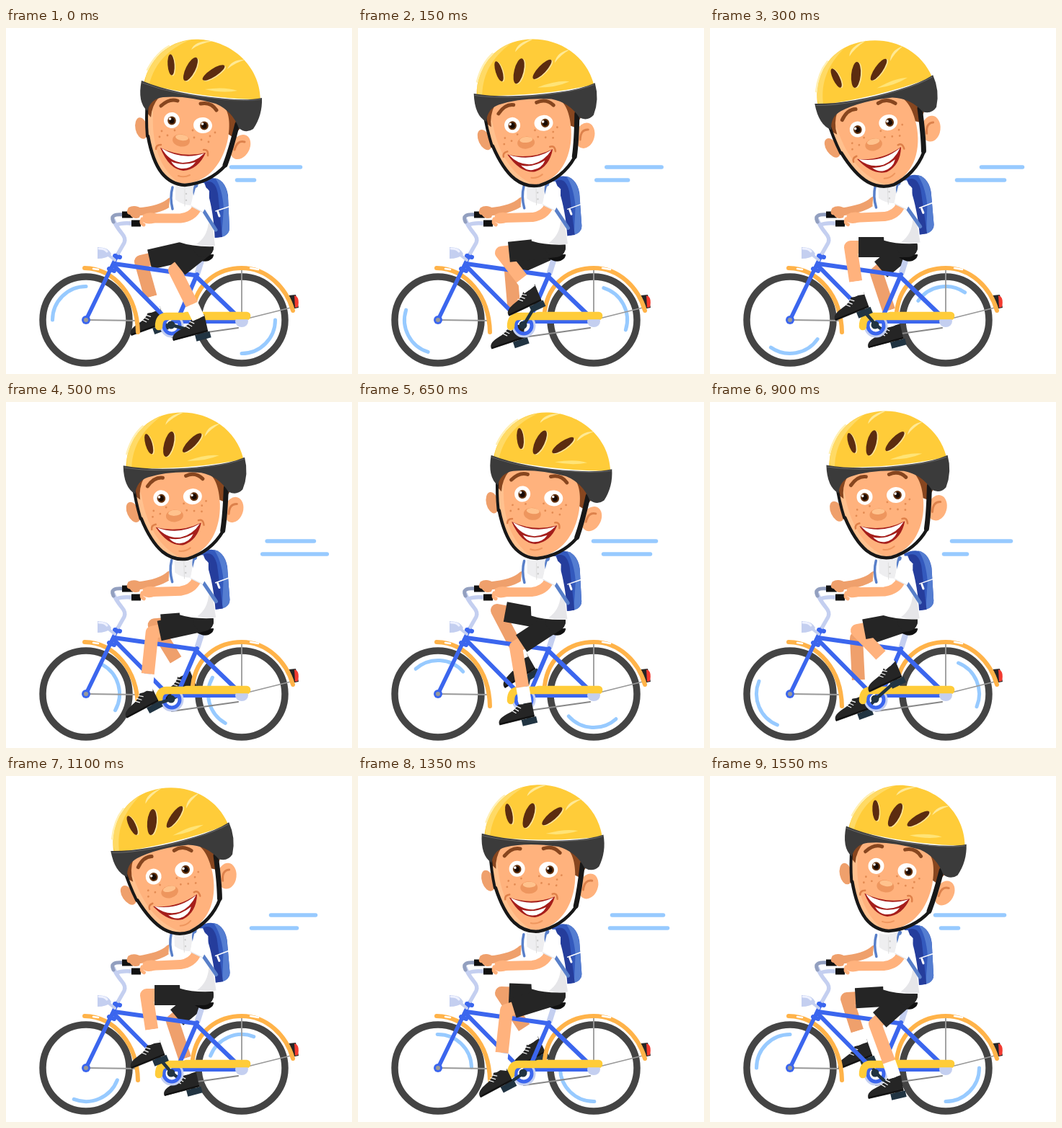
Recreate the animation shown at these times as an HTML page with a canvas. Size 480 by 480 pixels, loop 1600 ms.

```html
<!DOCTYPE html>
<html>
<head>
<meta charset="utf-8">
<style>
html, body { margin: 0; width: 100%; height: 100%; overflow: hidden; background: #fff; }
canvas { display: block; width: 480px; height: 480px; }
</style>
</head>
<body>
<canvas id="stage" width="480" height="480"></canvas>
<script>
const ctx = document.getElementById('stage').getContext('2d');
const LOOP = 1600, STEP = 50, CYCLE = 800, RAD = Math.PI / 180;
const SKIN = '#ffb27d', SKIN_DARK = '#efa06c', BLUE = '#3b66ee', STEEL = '#c4cff0',
      ORANGE = '#ffb349', YELLOW = '#ffcc39', BLACK = '#252525', TYRE = '#444', SKY = '#97caff';

// Smooth periodic interpolation through rows of values.
function track(period, times, rows) {
  const n = times.length;
  const at = i => times[(i + n) % n] + period * Math.floor(i / n);
  const row = i => rows[(i + n) % n];
  return t => {
    t %= period;
    let i = n - 1;
    while (times[i] > t) i--;
    const span = at(i + 1) - at(i), u = (t - at(i)) / span;
    return row(i).map((a, k) => {
      const b = row(i + 1)[k];
      const m0 = (b - row(i - 1)[k]) / (at(i + 1) - at(i - 1)) * span;
      const m1 = (row(i + 2)[k] - a) / (at(i + 2) - at(i)) * span;
      return a + u * (m0 + u * (3 * (b - a) - 2 * m0 - m1 + u * (2 * (a - b) + m0 + m1)));
    });
  };
}

const strokeTimes = [0, 100, 300, 550, 650, 750];
// knee x, y, ankle x, y, shoe tilt
const nearLeg = track(CYCLE, strokeTimes, [
  [234, 336, 267, 402, -15], [204, 317, 250, 365, -25], [195, 304, 205, 370, -22],
  [206, 325, 197, 407, -28], [219, 340, 232, 417, -14], [229, 344, 256, 417, -13]]);
const farLeg = track(CYCLE, strokeTimes, [
  [187, 324, 206, 392, -20], [203, 328, 207, 408, -20], [231, 340, 255, 412, -15],
  [199, 301, 243, 368, -28], [193, 289, 228, 356, -32], [190, 309, 210, 371, -22]]);
// tilt, rise
const headPose = track(LOOP, [0, 300, 650, 725, 900, 1100, 1350, 1550], [
  [0, 0], [-21.8, 0], [-1.5, -1], [0.3, -1.5], [-12.8, -2.5], [-21.8, -1], [-7.6, -2.5], [0.4, -3]]);
const torsoTilt = track(CYCLE, strokeTimes, [[0], [-1], [-2.4], [-1.5], [-.6], [-.6]]);
// left, right
const upperLine = track(LOOP, [0, 300, 400, 650, 775, 900, 1100, 1180, 1350, 1550], [
  [310, 411], [374, 436], [380, 438], [324, 416], [310, 411],
  [333, 420], [365, 432], [372, 436], [350, 426], [310, 411]]);
const lowerLine = track(LOOP, [0, 300, 450, 650, 785, 900, 1100, 1235, 1350, 1550], [
  [318, 347], [340, 411], [355, 452], [338, 408], [318, 347],
  [322, 359], [338, 406], [355, 452], [347, 432], [318, 347]]);

function fill(d, color) { ctx.fillStyle = color; ctx.fill(new Path2D(d)); }
function line(d, color, width, cap = 'round') {
  ctx.strokeStyle = color;
  ctx.lineWidth = width;
  ctx.lineCap = cap;
  ctx.lineJoin = 'round';
  ctx.stroke(new Path2D(d));
}
function oval(x, y, rx, ry, color, turn = 0) {
  ctx.fillStyle = color;
  ctx.beginPath();
  ctx.ellipse(x, y, rx, ry, turn * RAD, 0, 7);
  ctx.fill();
}
function arc(x, y, r, from, to, color, width) {
  ctx.strokeStyle = color;
  ctx.lineWidth = width;
  ctx.lineCap = 'round';
  ctx.beginPath();
  ctx.arc(x, y, r, from * RAD, to * RAD);
  ctx.stroke();
}
function turned(x, y, angle, draw) {
  ctx.save();
  ctx.translate(x, y);
  ctx.rotate(angle * RAD);
  draw();
  ctx.restore();
}
const mix = (a, b, u) => a + (b - a) * u;

function wheel(x, angle) {
  arc(x, 405, 60, 0, 360, TYRE, 9.5);
  arc(x, 405, 46.5, angle - 45, angle + 45, SKY, 5);
}

function crank([, , ax, ay, tilt]) {
  const s = Math.sin(tilt * RAD), c = Math.cos(tilt * RAD);
  line(`M230 412L${ax - c - 23 * s} ${ay - s + 23 * c}`, '#213442', 4.5);
}

function leg([kx, ky, ax, ay, tilt], skin) {
  const hx = 274, hy = 304;
  const sx = mix(kx, ax, .72), sy = mix(ky, ay, .72);
  turned(ax, ay, tilt, () => {
    fill('M-11 22H10V31H-11Z', '#213442');
    fill('M-10 0Q0 4 9 -3L8 22H-42C-44 14 -35 11 -27 9Q-16 7 -10 0Z', BLACK);
    line('M-41 20.5H7', '#111', 2);
    line('M-21 6L-16 11M-17 4L-12 9M-13 2L-8 6', '#fff', 1.2);
  });
  line(`M${hx} ${hy}L${kx} ${ky}L${sx} ${sy}`, skin, 18, 'butt');
  line(`M${sx} ${sy}L${ax} ${ay + 1}`, '#fff', 18, 'butt');
  line(`M${hx} ${hy}L${mix(hx, kx, .86)} ${mix(hy, ky, .86)}`, BLACK, 28, 'butt');
  oval(hx, hy, 14, 14, BLACK);
}

function bikeBack() {
  line('M111 405L183 406M327 336V405L395 388', '#999', 1.8);
  line('M230 429L322 416', '#888', 2.2);
  fill('M392 371L402 370L406 388L396 390Z', BLACK);
  fill('M400 371Q408 373 405 387L401 388Z', '#f33a30');
}

function bikeFront() {
  line('M109 333C151 334 182 372 183 422', ORANGE, 6);
  line('M121 334L128 335', '#fff', 2.5);
  line('M259 393C264 352 296 333 327 333C362 333 389 360 398 392', ORANGE, 6);
  line('M339 333L350 335', '#fff', 2.5);
  line('M272 320L265 342', STEEL, 8, 'butt');
  line('M150 327L262 343L318 397', BLUE, 6);
  line('M150 330L221 402M265 342L240 400M232 407H325', BLUE, 6);
  line('M155 314L111 405', BLUE, 5.5);
  line('M151 316L158 318M143 334L150 337', BLUE, 6);
  oval(111, 405, 6, 6, BLUE);
  oval(111, 405, 3, 3, '#999');
  fill('M262 318Q276 314 288 314Q289 319 281 323Q273 326 262 318Z', '#111');
  line('M156 312L164 298Q167 292 160 284Q152 274 149 266', STEEL, 5.5);
  line('M149 269Q143 257 163 259', '#929fbf', 5);
  line('M154 273Q160 270 174 271', STEEL, 5.5);
  line('M141 314L151 322', STEEL, 4);
  fill('M127 304Q143 304 146 314Q139 320 127 320Z', STEEL);
  line('M129 306Q137 306 140 310', '#eef1ff', 3);
  arc(230, 413, 13, 0, 360, STEEL, 7);
  arc(230, 413, 11, 0, 360, BLUE, 5);
  line('M212 414Q212 400 223 400H334', YELLOW, 10.5);
  oval(327, 407, 9, 8, STEEL);
  line('M250 399H334', YELLOW, 10.5);
}

function gripsAndBody(tilt) {
  line('M161 259H176M174 271H187', '#111', 9, 'butt');
  turned(185, 262, tilt, () => {
    ctx.translate(-185, -262);
    line('M228 241Q216 252 183 255', SKIN_DARK, 11);
    fill('M170 249Q179 244 189 251L185 263Q176 266 172 259Q165 258 170 249Z', SKIN_DARK);
    fill('M270 212C290 202 305 211 308 232L310 278Q310 290 289 291Q278 260 270 212Z', '#3359bd');
    fill('M290 208Q306 212 308 236L310 278Q309 288 299 290L302 250Q300 222 290 208Z', '#547dd1');
    fill('M276 214Q290 209 294 230L300 290L290 291L282 265Z', '#253d9c');
    line('M291 254L309 248', '#fff', 1.5);
    line('M294 255L296 261', '#fff', 3);
    fill('M230 215L275 215C284 235 290 270 290 303Q260 304 240 297L239 270L226 248Z', '#fff');
    fill('M290 302Q277 304 264 300Q279 290 281 270L287 278Z', '#e6e6e9');
    fill('M235 218Q245 224 262 216L257 246Q245 246 235 238Z', '#eeeef0');
    line('M231 221Q227 235 231 251', '#587fc9', 3.5);
    line('M264 218Q258 231 270 247L291 280', '#587fc9', 5);
    line('M248 224V247', '#ddd', 1);
    oval(250, 230, 1.2, 1.2, '#ccc');
    oval(250, 239, 1.2, 1.2, '#ccc');
    line('M265 249Q259 262 242 264L203 264', SKIN, 13);
    fill('M190 259Q199 254 210 258L207 270Q195 274 189 268Z', SKIN);
    line('M189 265Q186 271 191 273', SKIN, 5);
    fill('M263 222Q274 215 282 226Q283 241 273 256L256 247Z', '#fff');
    line('M257 247L272 255', '#e4e4e8', 1.2);
  });
}

function eye(x, y, rx, px) {
  oval(x, y, rx, 11, '#fff', 8);
  oval(px, y + .5, 5.8, 6, '#66340f');
  oval(px, y + .5, 3.6, 4, '#190b05');
  oval(px - 2.5, y - 2, 1.8, 1.8, '#fff');
}

function vent(x, y, rx, ry, turn) {
  oval(x + 1.5, y + 1, rx, ry, '#ffe59a', turn);
  oval(x, y, rx, ry, '#5c2c10', turn);
}

function face() {
  oval(188, 139, 8.5, 15, SKIN_DARK, -12);
  oval(325, 165, 13, 18, SKIN, 28);
  line('M317 169Q321 155 331 158', '#dd824c', 3);
  fill('M300 103L324 118L327 137L314 151L305 145Z', '#87461f');
  fill('M202 97C193 125 192 155 204 179C214 205 235 216 248 216C282 214 302 185 308 153C312 130 309 112 298 105C265 93 230 90 202 97Z', SKIN);
  fill('M202 98C193 125 192 155 204 179C211 199 225 211 240 215C213 195 202 160 204 119Z', '#ffc18f');
  fill('M195 96L213 95Q202 108 201 124L196 118Z', '#87461f');
  eye(230, 128, 11, 230);
  eye(273, 135, 13, 275);
  line('M215 108Q227 97 238 101', '#87461f', 5);
  line('M270 105Q284 102 292 114', '#87461f', 5);
  oval(243, 156, 12, 8.5, '#ee965e', 8);
  oval(244, 152, 9, 4, '#ffc28d', 8);
  const freckles = [[216, 143], [224, 149], [234, 142], [213, 151], [259, 142], [261, 152], [271, 155], [283, 150], [281, 158], [290, 145]];
  for (const [x, y] of freckles) oval(x, y, 1.4, 1.4, '#e38b53');
  fill('M214 166Q244 181 277 173Q267 196 246 198Q226 196 214 166Z', '#a51e1b');
  fill('M216 167Q244 184 275 174Q262 187 245 187Q226 185 216 167Z', '#fff');
  fill('M229 185Q244 192 263 186Q256 196 243 195Q234 194 229 185Z', '#fff');
  line('M208 168Q208 162 215 162M274 169Q281 168 280 177', '#df8049', 2.5);
  line('M239 205Q247 208 255 204', '#ee965e', 2);
}

function helmet() {
  line('M196 101Q194 125 196 150', '#181818', 4);
  line('M197 150Q203 184 216 201Q229 217 248 218Q282 215 304 191', '#181818', 4.5);
  line('M304 190Q312 169 321 133', '#181818', 7);
  fill('M191 77C201 34 236 13 270 16C313 19 352 52 353 99C297 99 240 89 191 77Z', YELLOW);
  fill('M194 67C205 36 230 20 254 17C225 30 207 48 199 77L193 76Z', '#ffda65');
  line('M196 58Q208 35 226 25', '#fff0b5', 2.5);
  fill('M257 30Q262 17 287 18Q267 22 257 30Z', '#ffe995');
  fill('M307 57Q313 43 332 44Q318 48 307 57Z', '#ffe995');
  fill('M276 85Q304 81 321 87Q300 91 276 85Z', '#ffe477');
  vent(229, 51, 4.7, 14.5, -4);
  vent(256, 57, 6.5, 18, 27);
  vent(288, 62, 5.5, 18, 57);
  fill('M188 73Q234 92 304 98Q335 101 355 97Q356 121 343 140Q333 147 323 139Q314 115 291 105Q249 93 218 96Q201 98 196 115Q182 103 188 73Z', '#3b3b3b');
  line('M189 76Q235 94 304 99Q334 102 353 99', '#666', 1);
}

function speedLine([left, right], y) {
  line(`M${left + 2.5} ${y}H${right - 2.5}`, SKY, 5.5);
}

function render(t) {
  ctx.fillStyle = '#fff';
  ctx.fillRect(0, 0, 480, 480);
  const turn = t / 1550;
  const spin = 225 - 720 * turn - 10 * Math.sin(Math.PI * turn);
  const near = nearLeg(t), far = farLeg(t);
  speedLine(upperLine(t), 193);
  speedLine(lowerLine(t), 211);
  wheel(111, spin);
  wheel(327, spin + 180);
  bikeBack();
  crank(far);
  leg(far, SKIN_DARK);
  bikeFront();
  crank(near);
  oval(229, 412, 5.5, 5.5, '#213442');
  leg(near, SKIN);
  gripsAndBody(torsoTilt(t)[0]);
  const [tilt, rise] = headPose(t);
  turned(250, 200 + rise, tilt, () => {
    ctx.translate(-250, -200);
    face();
    helmet();
  });
}

const start = performance.now();
function tick() {
  const elapsed = (performance.now() - start) % LOOP;
  render(Math.floor(elapsed / STEP) * STEP);
  requestAnimationFrame(tick);
}
tick();
</script>
</body>
</html>
```
